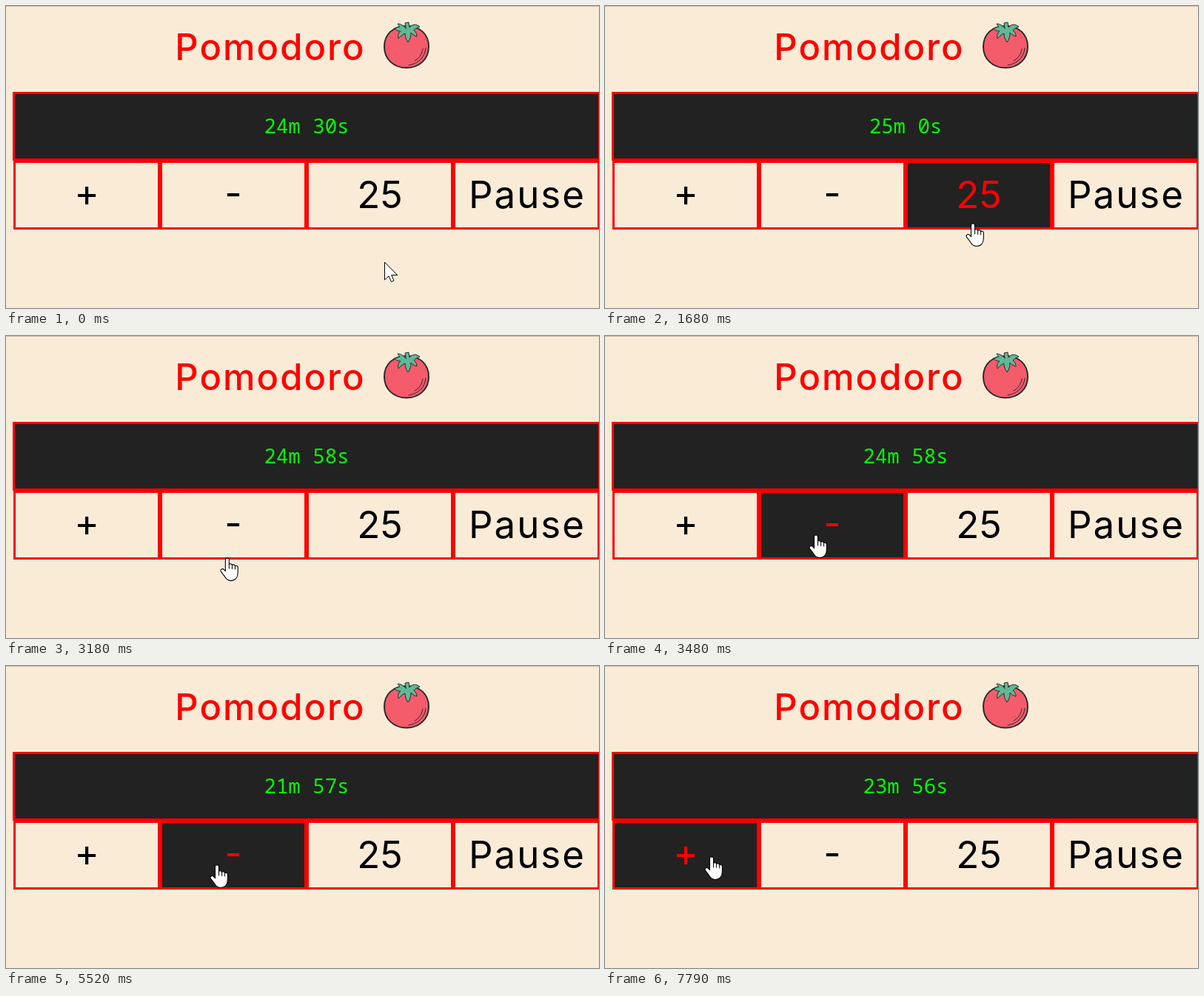
Write an HTML page with a canvas that moves like this. It is 801 px wide and 408 px high and loops after 8 s.

```html
<!DOCTYPE html>
<html lang="en">
<head>
<meta charset="utf-8">
<title>Pomodoro</title>
<style>
html, body { margin: 0; width: 100%; height: 100%; overflow: hidden; background: #faebd7; }
canvas { display: block; width: 801px; height: 408px; }
</style>
</head>
<body>
<canvas id="stage" width="801" height="408"></canvas>
<script>
const ctx = document.getElementById('stage').getContext('2d');
const LOOP = 8000;
const STEP = 70;     // pointer refresh
const SECOND = 1020; // countdown period
const HOLD = 230;    // how long a click is held
const CREAM = '#faebd7', DARK = '#222', RED = '#f00', INK = '#2b2b2b';
const SANS = 'Montserrat, Inter, sans-serif';
const MONO = '"Noto Sans Mono", "DejaVu Sans Mono", monospace';
const LABELS = ['+', '-', '25', 'Pause'];
const RELEASES = [1680, 4020, 4660, 5520, 7080, 7790];

// Each move bends towards `via` and slows down by the power `ease`.
const HOME = [511, 346];
const MOVES = [
  { start: 70, end: 110, steps: 2, ease: 1.7, via: [502, 340], to: [494, 334] },
  { start: 1050, end: 1130, steps: 2, ease: 1.7, via: [496, 313], to: [497, 293] },
  { start: 2760, end: 3480, steps: 11, ease: 1.7, via: [309, 371], to: [285, 268] },
  { start: 5920, end: 6150, steps: 4, ease: 3.7, via: [214, 278], to: [144, 257] }
];

function pointerAt(t) {
  let pos = HOME;
  for (const { start, end, steps, ease, via, to } of MOVES) {
    if (t < start) break;
    const step = t >= end ? steps : Math.min(steps, Math.floor((t - start) / STEP) + 1);
    const u = 1 - (1 - step / steps) ** ease, v = 1 - u;
    pos = pos.map((a, i) => v * v * a + 2 * u * v * via[i] + u * u * to[i]);
  }
  return pos;
}

const buttonAt = ([x, y]) => y > 211 && y < 299 ? Math.floor((x - 10) / 198) : -1;

// Every click restarts the interval; a reset also swallows one second.
function secondsAt(t) {
  let left = 24 * 60 + 30, since = -180, lag = 0;
  const elapse = now => {
    const ticks = Math.floor((now - since) / SECOND);
    if (ticks) left -= ticks + lag;
  };
  for (const release of RELEASES) {
    if (t < release) break;
    elapse(release);
    const key = LABELS[buttonAt(pointerAt(release))];
    if (key === '25') left = 25 * 60;
    else left += key === '+' ? 60 : -60;
    lag = key === '25' ? 1 : 0;
    since = release;
  }
  elapse(t);
  return left;
}

function box(x, y, w, h, fill) {
  ctx.fillStyle = RED;
  ctx.fillRect(x, y, w, h);
  ctx.fillStyle = fill;
  ctx.fillRect(x + 3, y + 3, w - 6, h - 6);
}

function label(str, x, y, font, color, spacing = 0) {
  ctx.font = font;
  ctx.letterSpacing = spacing + 'px';
  ctx.textAlign = 'center';
  ctx.fillStyle = color;
  ctx.fillText(str, x + spacing / 2, y);
}

function shape(d, x, y, fill, stroke, width) {
  const path = new Path2D(d);
  ctx.save();
  ctx.translate(x, y);
  ctx.lineJoin = ctx.lineCap = 'round';
  if (fill) {
    ctx.fillStyle = fill;
    ctx.fill(path);
  }
  ctx.strokeStyle = stroke;
  ctx.lineWidth = width;
  ctx.stroke(path);
  ctx.restore();
}

function tomato() {
  shape('M-30 0C-30-17-18-28 0-28S30-17 30 0S17 28.5 0 28.5S-30 17-30 0Z', 541, 55, '#f45b6b', INK, 2);
  shape('M26 2C25 14 16 23 3 25M22 3C21 10 17 16 11 19', 541, 55, null, INK, 1);
  shape('M-2-4L-3-11L2-12L3-5C7-10 12-10 17-6C13-5 11-3 9-1C12 1 13 4 13 7C9 6 7 4 5 2' +
    'C5 7 4 11 1 15C-2 11-3 7-3 3C-6 4-9 7-12 10C-13 6-12 2-9 0C-12 0-15-1-17-3' +
    'C-14-5-12-6-10-6C-11-7-12-8-13-10C-8-10-5-7-2-4Z', 542, 34, '#5fb896', INK, 1);
}

function hand(x, y) {
  shape('M-2.5 3C-2.5.4 2.5.4 2.5 3V9.5C3.5 8.2 6.2 8.6 6.6 10.4C7.8 9.2 10.2 9.8 10.6 11.6' +
    'C12 10.6 14.4 11.6 14.4 13.8V20C14.4 27 11 31.5 5 31.5C0 31.5-2 29-4 25L-8.8 18.8' +
    'C-9.8 16.4-6.8 14.6-4.8 16.2L-2.5 18.6Z', x, y, '#fff', '#000', 1.1);
  shape('M2.5 9.5V15M6.6 10.4V15.5M10.6 11.6V16', x, y, null, '#000', 1);
}

function arrow(x, y) {
  shape('M.5.5V24L6 18.8L9.4 26.6L13 25L9.7 17.6H17.3Z', x, y, '#fff', '#000', 1);
}

function draw(t) {
  const pos = pointerAt(t), hover = buttonAt(pos), left = secondsAt(t);

  ctx.fillStyle = CREAM;
  ctx.fillRect(0, 0, 801, 408);
  ctx.fillStyle = '#c9bcac';
  ctx.fillRect(0, 0, 801, 1);

  label('Pomodoro', 356, 73, '450 49px ' + SANS, RED, 2);
  tomato();

  box(9, 116, 794, 93, DARK);
  label(`${Math.floor(left / 60)}m ${left % 60}s`, 406, 172, '500 27.4px ' + MONO, '#0f0');

  LABELS.forEach((str, i) => {
    const x = 10 + i * 198, on = i === hover;
    const y = str.length > 1 ? 273 : 271;
    box(x, 209, 198, 93, on ? DARK : CREAM);
    label(str, x + 99, y, '400 51px ' + SANS, on ? RED : '#000', str.length > 2 ? 2 : 0);
  });

  (pos[1] <= 302 ? hand : arrow)(...pos);

  if (RELEASES.some(r => t >= r - HOLD && t < r)) {
    ctx.fillStyle = 'rgba(255, 255, 0, 0.47)';
    ctx.beginPath();
    ctx.arc(...pos, 18, 0, Math.PI * 2);
    ctx.fill();
  }
}

const start = performance.now();
function tick() {
  draw((performance.now() - start) % LOOP);
  requestAnimationFrame(tick);
}
tick();
</script>
</body>
</html>
```
